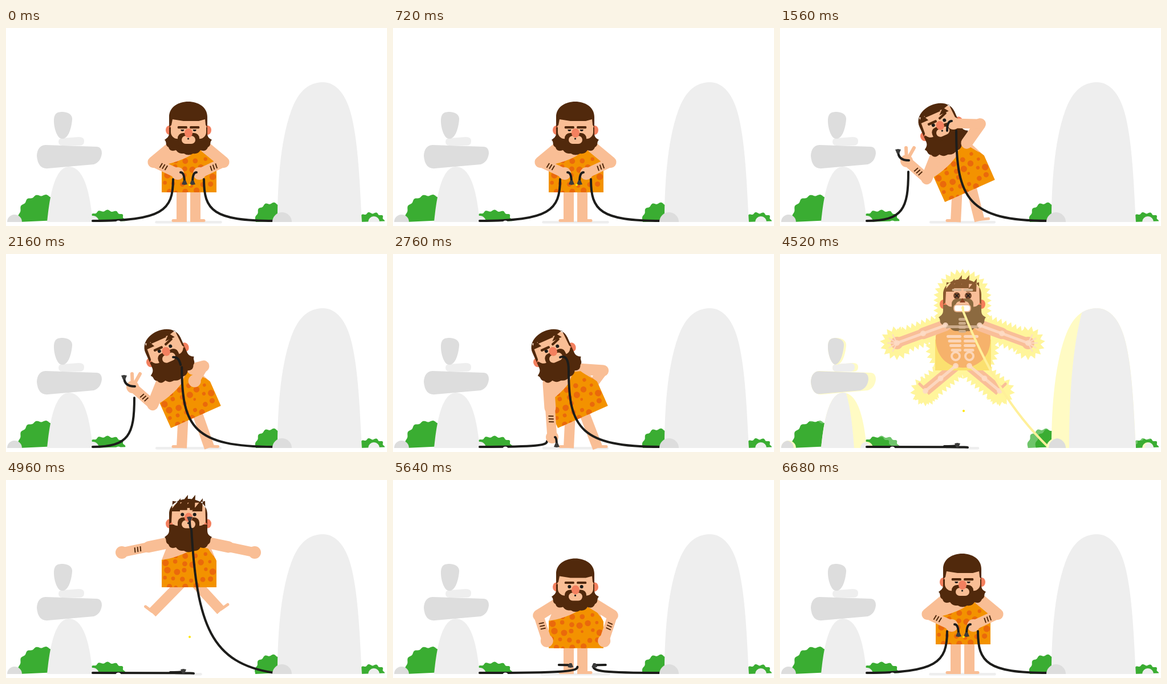
An HTML page with a canvas that plays this animation: 668x347 px, repeating every 6.72 s.

```html
<!DOCTYPE html>
<html lang="en">
<head>
<meta charset="utf-8">
<title>Caveman and cables</title>
<style>
html, body { margin: 0; width: 100%; height: 100%; overflow: hidden; background: #fff; }
canvas { display: block; }
</style>
</head>
<body>
<canvas id="stage" width="668" height="347"></canvas>
<script>
const c = document.getElementById('stage').getContext('2d');
const LOOP = 6720, STEP = 40, FLOOR = 340, MID = 320;
const BLACK = '#1d1d1b', GREEN = '#3aad32', LIGHT = '#eeeeee', GREY = '#dddddd';
const GLOW = '#fff59b', PALE_GLOW = '#fffbc4', BONE = '#fddcc6', RIB = '#d6b697';
const NORMAL = { skin: '#f9be95', hair: '#51290c', beard: '#51290c', ear: '#f3805f' };
const CHARGED = { skin: '#f9be98', hair: '#8a5a30', beard: '#8c6a40', ear: '#f47f5a' };

// ---- drawing helpers ----
function fill(path, color) { c.fillStyle = color; c.fill(path); }
function stroke(path, color, width, cap = 'round') {
  c.strokeStyle = color; c.lineWidth = width; c.lineCap = cap; c.lineJoin = 'round';
  c.stroke(path);
}
function poly(points) {
  const path = new Path2D();
  points.forEach(([x, y]) => path.lineTo(x, y));
  return path;
}
function line(points, color, width, cap) { stroke(poly(points), color, width, cap); }
function oval(x, y, rx, ry = rx, from = 0, to = 2 * Math.PI) {
  const path = new Path2D();
  path.ellipse(x, y, rx, ry, 0, from, to);
  return path;
}
function pill(x, y, w, h, r = h / 2) {
  const path = new Path2D();
  path.roundRect(x, y, w, h, r);
  return path;
}
function placed(x, y, angle, draw) {
  c.save(); c.translate(x, y); c.rotate(angle); draw(); c.restore();
}
const mound = (x, r) => oval(x, FLOOR, r, r, Math.PI, 2 * Math.PI);

// ---- scenery ----
function bush(x, rx, ry) {
  const points = [], waves = 5 + rx / 4;
  for (let a = 0; a <= Math.PI; a += Math.PI / 90) {
    const ripple = 1.4 * Math.sin(a * waves);
    points.push([x - (rx + ripple) * Math.cos(a), FLOOR - (ry + ripple) * Math.sin(a) ** .75]);
  }
  return poly(points);
}
// path, light width, light direction
const bushes = [[bush(64, 42, 47), -6], [bush(177, 31, 20), -14], [bush(467, 29, 33), 14], [bush(641, 22, 16), 4]];
// path, color, light width, stretch that lets the light taper upward
const rocks = [
  [new Path2D('M72 340C76 300 84 244 110 243C140 243 148 300 152 340Z'), LIGHT, -22, 1.35],
  [new Path2D('M92 199Q92 193 100 193L128 191Q137 191 137 198Q137 206 129 206L99 206Q92 206 92 199Z'), LIGHT, -6, 1],
  [new Path2D('M54 224Q55 206 69 205L158 208Q168 208 168 220Q166 235 154 239L74 246Q56 248 54 224Z'), GREY, -13, 1],
  [new Path2D('M84 163C84 148 91 147 100 147C110 148 117 152 116 161C114 180 108 195 98 194C90 194 84 176 84 163Z'), GREY, -4, 1],
  [new Path2D('M476 340C476 280 480 200 500 145C513 110 530 96 555 95C580 95 597 118 606 155C618 205 620 270 624 340Z'), LIGHT, 31, 1.25],
  [mound(15, 13), GREY, -4, 1],
  [mound(152, 11), LIGHT, -5, 1],
  [mound(645, 10), LIGHT, 4, 1]
];
function lit(path, color, shift, stretch, glow, zap) {
  fill(path, zap ? glow : color);
  if (!zap) return;
  c.save();
  c.clip(path);
  c.translate(shift, FLOOR); c.scale(1, stretch); c.translate(0, -FLOOR);
  fill(path, color);
  c.restore();
}
function scenery(pull, zap) {
  bushes.forEach(([path, shift], i) =>
    placed(i == 2 ? -pull : 0, 0, 0, () => lit(path, GREEN, shift, 1, '#6fc56b', zap)));
  rocks.forEach(([path, color, shift, stretch]) => lit(path, color, shift, stretch, PALE_GLOW, zap));
}

// ---- poses ----
const mix = (a, b, k) => {
  if (typeof a == 'number') return a + (b - a) * k;
  if (Array.isArray(a)) return a.map((v, i) => mix(v, b[i], k));
  return Object.fromEntries(Object.keys(a).map(n => [n, mix(a[n], b[n], k)]));
};
const mirror = side => Object.fromEntries(Object.entries(side).map(([n, v]) =>
  [n, Array.isArray(v) ? v.map((q, i) => i % 2 ? q : 2 * MID - q) : v]));
const vary = (pose, body, L, R) => ({ ...pose, ...body, L: { ...pose.L, ...L }, R: { ...pose.R, ...R } });
const both = (pose, body, L) => vary(pose, body, L, mirror(L));

// z: 0 behind the body, 1 before it, 2 before the face; tip: start and end of the wire past the hand
const hold = both({}, { px: MID, py: 288, rot: 0, hy: 6, pitch: 1, spike: 0, open: 0, brow: 0, bite: 0 },
  { hand: [301, 255], bend: 1, z: 1, foot: [308, FLOOR], wire: [293, 265], tip: [306, 253, 313, 271], plug: 1, slack: 1 });
const jolt = both(hold, { py: 284, hy: -6, pitch: 0, spike: .8, open: 1 },
  { hand: [290, 238], wire: [284, 248], tip: [295, 236, 302, 254] });
const test = vary(hold, { px: 332, py: 286, rot: -24, hy: 0, pitch: -.15, open: .7, brow: 1 },
  { hand: [222, 233], bend: -1, wire: [225, 252], tip: [226, 232, 207, 216] },
  { hand: [304, 167], bend: -1, z: 2, foot: [350, 338], wire: [309, 180], tip: [301, 163, 293, 180], plug: 0 });
const bite = vary(test, { bite: 1 }, {},
  { hand: [340, 242], bend: 1, z: 0, foot: [359, FLOOR], wire: [308, 205], tip: [308, 205, 293, 181] });
const drop = vary(bite, {}, { hand: [279, 321], bend: 0, wire: [270, 328], tip: [284, 321, 287, 335] });
const ready = vary(both(hold, { py: 286, hy: 0, pitch: 0, bite: 1 },
  { hand: [295, 245], z: 0, wire: [292, 284], tip: [292, 284, 292, 280], plug: 0 }), {}, {},
  { wire: [339, 185], tip: [339, 185, 325, 172] });
const fallen = { wire: [329, 339], tip: [288, 337, 311, 335], plug: 1 };
const shock = vary(both(ready, { py: 204, hy: 5, pitch: -.5, spike: 1, open: 1 },
  { hand: [205, 156], z: 1, bend: 0, foot: [255, 240] }), {}, fallen,
  { wire: [321, 100], tip: [321, 100, 320, 95], slack: .2, plug: 0 });
const fly = vary(shock, { py: 188, hy: 10, pitch: -.6, bite: 0 },
  { hand: [203, 127], foot: [256, 233] },
  { hand: [436, 127], foot: [377, 229], wire: [325, 86], tip: [325, 86, 322, 68], plug: 1, slack: .8 });
const land = vary(both(hold, { py: 296, hy: 8, open: .6 }, { hand: [264, 287] }), {}, fallen,
  { wire: [352, 338], tip: [380, 337, 358, 335] });

const keys = [
  [0, hold], [120, hold], [240, jolt], [480, jolt], [640, hold], [760, hold], [860, jolt], [1100, jolt],
  [1400, test], [2000, test], [2240, bite], [2400, bite], [2680, drop], [2840, drop], [3200, ready],
  [4120, ready], [4240, shock], [4840, shock], [4920, fly], [5000, fly], [5240, land], [5520, land],
  [6000, hold], [LOOP, hold]
];
function poseAt(t) {
  const i = keys.findIndex(k => k[0] > t);
  const [t0, a] = keys[i - 1], [t1, b] = keys[i];
  const k = (t - t0) / (t1 - t0);
  return mix(a, b, k * k * (3 - 2 * k));
}

// ---- the man ----
const garment = new Path2D('M273 238C290 236 310 229 322 222L338 207L350 211C357 224 369 236 369 240V286H273Z');
const torso = new Path2D('M288 200L273 238V275H369V240L352 200Z');
const roundTorso = new Path2D('M290 203L273 225C268 300 374 300 369 225L352 203Z');
const beard = new Path2D('M286 166L286 176C286 183 282 185 278 188C283 193 278 197 285 201C287 208 293 208 298 206' +
  'C303 213 308 212 312 212Q320 217 328 212C334 213 338 211 341 206C348 209 352 206 354 201' +
  'C361 197 356 193 361 188C355 185 353 182 353 176L353 166Z');

function spots() {
  let seed = 7;
  const random = () => (seed = seed * 16807 % 2147483647) / 2147483647;
  for (let i = 0; i < 28; i++) {
    const x = 280 + i % 6 * 16 + random() * 7 - (i / 6 & 1) * 5;
    fill(oval(x, 226 + Math.floor(i / 6) * 14 + random() * 7, 1.5 + random() * 4.5), '#ea690b');
  }
}
// Two-bone elbow; bend 1 points outward, -1 inward
function elbow([sx, sy], [hx, hy], bend) {
  const upper = 41, fore = 47, dx = hx - sx, dy = hy - sy, d = Math.hypot(dx, dy);
  if (d >= upper + fore) return [sx + dx * .46, sy + dy * .46];
  const along = (upper ** 2 - fore ** 2 + d * d) / (2 * d);
  const off = Math.sqrt(Math.max(0, upper ** 2 - along ** 2)) * bend;
  return [sx + (dx * along - dy * off) / d, sy + (dy * along + dx * off) / d];
}
function arm(a, pal, marks, fingers) {
  const [shoulder, joint, hand] = a, [x, y] = hand;
  if (fingers) for (const dx of [-1, 13]) line([hand, [x + dx, y - 23]], pal.skin, 6);
  line([shoulder, joint], pal.skin, 20);
  line([joint, hand], pal.skin, 17);
  fill(oval(x, y, 11), pal.skin);
  if (marks) placed(...joint, Math.atan2(y - joint[1], x - joint[0]), () => {
    for (let i = 15; i < 26; i += 5) line([[i, -5], [i - 1, 4]], NORMAL.hair, 2, 'butt');
  });
}
function leg(hip, [x, y], out, pal) {
  const d = Math.hypot(x - hip[0], y - hip[1]);
  const flat = y > FLOOR - 1;
  const toe = flat ? [x + out * 15, FLOOR - 2.5] : [x + out * 16 * (y - hip[1]) / d, y - out * 16 * (x - hip[0]) / d];
  line([hip, [x, y]], pal.skin, 18, 'butt');
  line([[x, y - 2.5], toe], pal.skin, 5);
}
function hairShape(spike, fringe) {
  const hair = new Path2D(`M286 166V148C286 112 353 112 353 148V166L350 162L349 ${fringe - 3}` +
    `L338 ${fringe}L311 ${fringe}L292 ${fringe - 3}L290 162Z`);
  for (let i = 0; i < 4; i++) {
    const x = 293 + i * 13, y = 124 + 6 * Math.abs(i - 1.5);
    const reach = i < 2 ? 1 : spike;
    hair.addPath(poly([[x - 6, y + 10], [x + 5 + 8 * spike, y - reach * (4 + 9 * spike)], [x + 12, y + 10]]));
  }
  return hair;
}
function head(p, pal, zap) {
  const f = 14 * p.pitch, ear = 167 + 4 * p.pitch;
  c.save();
  c.translate(0, p.hy);
  for (const x of [286.5, 353.5]) fill(oval(x, ear, 6.5, 8), pal.ear);
  fill(beard, pal.beard);
  fill(pill(289, 126, 62, 49 + f * .8, [20, 20, 12, 12]), pal.skin);
  fill(pill(301, 162 + f, 38, 26, 9), pal.beard);
  fill(pill(308, 167 + f, 24, 14, 7), pal.skin);
  fill(hairShape(p.spike, 138 + 17 * p.pitch), pal.hair);
  c.translate(0, f);
  if (zap) skull();
  else face(p, pal);
  c.restore();
}
function face(p, pal) {
  for (const s of [-1, 1]) {
    const x = MID + s * 10.7, raise = 5 * p.open * (1 - p.brow) + (s > 0 ? 4 * p.brow : 0);
    fill(oval(x, 156 + p.open, 3, 3, 0, p.open < .4 ? Math.PI : 2 * Math.PI), BLACK);
    placed(x, 152 - raise, s > 0 ? -.33 * p.brow : 0, () => fill(pill(-8.5, -2, 17, 4.2, 1.5), pal.hair));
  }
  fill(oval(MID, 162, 7, 8), pal.ear);
  if (p.bite < .5) fill(oval(319.5, 172, 1.6), BLACK);
}
function skull() {
  for (const x of [310, 330]) {
    fill(oval(x, 157, 6), '#7a4a2c');
    for (const s of [-3, 3]) line([[x - 3, 157 - s], [x + 3, 157 + s]], BLACK, 1.5);
    fill(pill(x - 8.5, 145, 17, 4), RIB);
  }
  fill(poly([[320, 161], [325, 169], [315, 169]]), '#8a4325');
  fill(pill(304, 172, 31, 14, 6), '#e8b48e');
  fill(pill(306, 174, 27, 10, 4), '#fff');
}
function bone(points) {
  line(points, BONE, 5);
  points.forEach(([x, y]) => fill(oval(x, y, 5), BONE));
}
function skeleton(y, arms, legs) {
  c.save();
  c.globalAlpha = .85;
  arms.forEach((a, side) => {
    const [x, hy] = a[2];
    bone(a);
    for (let i = -2; i <= 2; i++) {
      const d = (side ? 0 : Math.PI) + i * .55;
      line([[x, hy], [x + 16 * Math.cos(d), hy + 16 * Math.sin(d)]], BONE, 2.5);
    }
  });
  legs.forEach(([hip, foot]) => bone([hip, mix(hip, foot, .5), foot]));
  fill(pill(292, y - 79, 55, 5), RIB);
  for (let i = 0; i < 4; i++) {
    const w = 26 - 2.5 * i;
    fill(pill(313, y - 92 + i * 7, 13, 5), RIB);
    for (const x of [MID - 2 - w, MID + 2]) fill(pill(x, y - 62 + i * 8, w, 5), BONE);
  }
  for (const x of [308, 332]) stroke(oval(x, y - 25, 7), BONE, 4);
  c.restore();
}
// Capsule from a to b with a toothed rim
function spiky([ax, ay], [bx, by], r) {
  const len = Math.hypot(bx - ax, by - ay), cap = Math.PI * r, around = 2 * (len + cap);
  const teeth = Math.round(around / 9), points = [];
  for (let i = 0; i < 2 * teeth; i++) {
    const s = i / teeth / 2 * around, R = r + i % 2 * 8;
    if (s < len) points.push([s, -R]);
    else if (s < len + cap) { const a = (s - len) / r; points.push([len + R * Math.sin(a), -R * Math.cos(a)]); }
    else if (s < 2 * len + cap) points.push([2 * len + cap - s, R]);
    else { const a = (s - 2 * len - cap) / r; points.push([-R * Math.sin(a), R * Math.cos(a)]); }
  }
  placed(ax, ay, Math.atan2(by - ay, bx - ax), () => fill(poly(points), GLOW));
}
function aura(y, arms, legs) {
  spiky([MID, y - 127], [MID, y - 105], 43);
  spiky([MID - 12, y - 39], [MID + 12, y - 39], 45);
  for (const [shoulder, , hand] of arms) { spiky(shoulder, hand, 16); spiky(hand, hand, 22); }
  for (const [hip, foot] of legs) { spiky(hip, foot, 17); spiky(foot, foot, 19); }
}

// ---- cables ----
// Slack wire lies along the floor, then rises; taut wire runs straight
function cable(x0, { wire, slack }, color) {
  const [x, y] = wire, start = [x0, 338], path = new Path2D();
  const a = mix(mix(start, wire, 1 / 3), [x0 + (x - x0) * .87, 338], slack);
  const b = mix(mix(start, wire, 2 / 3), [x, y + (338 - y) * .75], slack);
  path.moveTo(...start);
  path.bezierCurveTo(...a, ...b, x, y);
  stroke(path, color, 4);
}
function tip({ tip: [x, y, ex, ey], plug }, bite, color) {
  const [a, b] = mix([ex, y], [x, ey - 6], bite), path = new Path2D();
  path.moveTo(x, y);
  path.quadraticCurveTo(a, b, ex, ey);
  stroke(path, color, 4);
  if (plug > .5) placed(ex, ey, Math.atan2(ey - b, ex - a), () =>
    fill(poly([[-4, -2], [3, -5], [4, 0], [3, 5], [-4, 2]]), '#3c3c3b'));
}

function man(p, zap) {
  const { L, R } = p, pal = zap ? CHARGED : NORMAL, wireColor = zap ? '#fff09a' : BLACK;
  const r = p.rot * Math.PI / 180, cos = Math.cos(r), sin = Math.sin(r);
  const arms = [L, R].map((side, i) => {
    const out = i ? 1 : -1;
    const shoulder = [p.px + out * 30 * cos + 79 * sin, p.py + out * 30 * sin - 79 * cos];
    return [shoulder, elbow(shoulder, side.hand, -out * side.bend), side.hand];
  });
  const legs = [L, R].map((side, i) => [[MID + (p.px - MID) * .25 + (i ? 12 : -12), p.py - 8], side.foot]);
  const body = draw => placed(p.px, p.py, r, () => { c.translate(-MID, -286); draw(); });
  const leftArm = () => arm(arms[0], pal, !zap && L.z > .5, L.bend < -.5);
  const rightArm = () => arm(arms[1], pal, !zap && R.z > .5 && R.bend > .5);
  const leftBehind = L.z < .5 || L.wire[1] > 336;

  if (zap) aura(p.py, arms, legs);
  if (leftBehind) cable(152, L, BLACK);
  legs.forEach(([hip, foot], i) => leg(hip, foot, i ? 1 : -1, pal));
  if (L.z < .5) leftArm();
  if (R.z < .5) rightArm();
  body(() => {
    if (zap) {
      fill(pill(272, 232, 98, 54, 0), '#fbe06f');
      fill(roundTorso, '#f6b26b');
      return;
    }
    fill(torso, pal.skin);
    fill(garment, '#f39200');
    c.save(); c.clip(garment); spots(); c.restore();
  });
  if (!leftBehind) cable(152, L, BLACK);
  if (L.z >= .5) leftArm();
  if (R.z >= .5 && R.z < 1.5) rightArm();
  body(() => head(p, pal, zap));
  if (zap) skeleton(p.py, arms, legs);
  cable(470, R, wireColor);
  if (R.z >= 1.5) rightArm();
  if (L.z >= .5) tip(L, 0, BLACK);
  tip(R, p.bite, wireColor);
  if (R.tip[2] - L.tip[2] < 15 && R.z == 1) fill(oval(322, 275, 2), '#ffe600');
}

function render(t) {
  const p = poseAt(t), zap = t >= 4200 && t < 4880;
  const shade = Math.max(20, 58 - (286 - p.py) * .35);
  c.clearRect(0, 0, 668, 347);
  fill(pill(MID - shade, 338, 2 * shade, 4.5), LIGHT);
  scenery(4 * (1 - p.R.slack), zap);
  man(p, zap);
  lit(mound(484, 17), GREY, 4, 1, PALE_GLOW, zap);
  fill(oval(197, 342, 5, 4.5), '#fff');
}
function tick(now) {
  render(Math.floor(now % LOOP / STEP) * STEP);
  requestAnimationFrame(tick);
}
requestAnimationFrame(tick);
</script>
</body>
</html>
```
